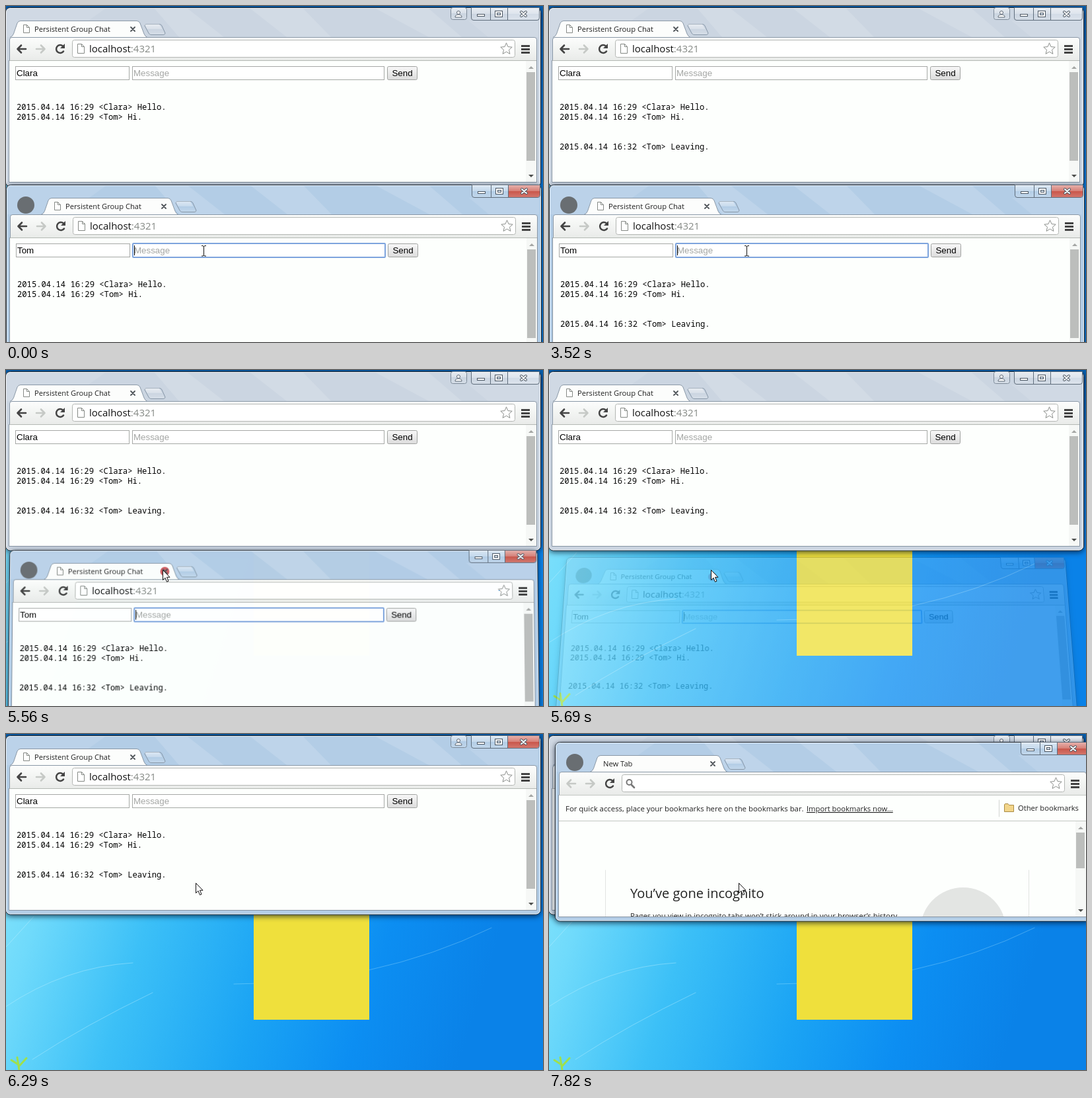
Animation of 813x508 px, one loop 8 s. Source, as an HTML page:

```html
<!DOCTYPE html>
<html lang="en">
<head>
<meta charset="utf-8">
<title>Persistent Group Chat</title>
<style>
html, body { margin: 0; width: 100%; height: 100%; overflow: hidden; background: #0a78dc; }
#stage { position: relative; width: 813px; height: 508px; overflow: hidden; }
svg { position: absolute; left: 0; top: 0; overflow: visible; }
.win { position: absolute; width: 813px; height: 275px; --glass: #cbd5e1; --close: #d3dce7; }
.win.active { --glass: #b3cde6; --close: #c9564a; }
#one { left: 0; top: 0; }
#two { left: 1px; top: 268px; transform-origin: 384px 153px; }
#three { left: 10px; top: 10px; transform-origin: 400px 115px; }
.frame { fill: var(--glass); stroke: #1f2a35; filter: drop-shadow(0 2px 4px rgba(0, 10, 30, .7)); }
.close { fill: var(--close); }
.ui { font: 11.2px "Open Sans", "Noto Sans", sans-serif; fill: #222; }
.url { font-size: 15px; fill: #111; }
.form { font: 13.33px "Liberation Sans", Arial, sans-serif; fill: #000; }
.hint { fill: #a4a6a4; }
.chat { font: 12.2px "Noto Sans Mono", "DejaVu Sans Mono", monospace; fill: #000; }
.line { fill: none; stroke-linecap: round; stroke-linejoin: round; }
</style>
</head>
<body>
<div id="stage">
  <svg id="desk" width="813" height="508">
    <defs>
      <linearGradient id="sky" x2="1" y2=".2">
        <stop offset="0" stop-color="#8ee8fb"/>
        <stop offset=".16" stop-color="#6fdafb"/>
        <stop offset=".36" stop-color="#3cc0f7"/>
        <stop offset=".6" stop-color="#1ba4f4"/>
        <stop offset=".8" stop-color="#0c8ef2"/>
        <stop offset="1" stop-color="#0a82e8"/>
      </linearGradient>
      <linearGradient id="top" x2="0" y2="1">
        <stop offset="0" stop-color="#075fae"/>
        <stop offset=".5" stop-color="#0a70c8" stop-opacity="0"/>
      </linearGradient>
      <linearGradient id="bar" x2="0" y2="1">
        <stop offset="0" stop-color="#fcfdfc"/>
        <stop offset="1" stop-color="#e9ebe9"/>
      </linearGradient>
      <linearGradient id="gloss" x2="0" y2="1">
        <stop offset="0" stop-color="#fff" stop-opacity=".55"/>
        <stop offset=".48" stop-color="#fff" stop-opacity=".25"/>
        <stop offset=".5" stop-color="#fff" stop-opacity="0"/>
        <stop offset="1" stop-color="#fff" stop-opacity=".2"/>
      </linearGradient>
      <linearGradient id="button" x2="0" y2="1">
        <stop offset="0" stop-color="#f8f8f8"/>
        <stop offset="1" stop-color="#dcdcdc"/>
      </linearGradient>
      <clipPath id="page"><path d="M5 83H803V266H5Z"/></clipPath>
    </defs>
    <path fill="url(#sky)" d="M0 0H813V508H0Z"/>
    <path fill="url(#top)" d="M0 0H813V508H0Z"/>
    <g class="line" stroke="#c8f3ff">
      <path opacity=".3" d="M345 378Q560 378 735 293"/>
      <path opacity=".4" d="M0 412Q90 352 192 346M0 322L42 276"/>
      <path opacity=".4" d="M40 492Q120 440 222 391"/>
    </g>
    <path class="line" stroke="#9fe04c" stroke-width="3" d="M20 508L17 489M19 500L8 493M20 502L31 490"/>
    <path fill="#efe03c" d="M375 257H550V432H375Z"/>
  </svg>
  <div class="win" id="one"></div>
  <div class="win active" id="two"></div>
  <div class="win active" id="three"></div>
  <svg id="pointer" width="1" height="1">
    <path id="arrow" fill="#fff" stroke="#111" d="M.5.5V15.5L4 12.2L6.5 18.3L9 17.2L6.5 11.3H11Z"/>
    <path id="beam" fill="none" stroke="#111" d="M-3-7.5H-1L.5-6.5L2-7.5H4M.5-7V7.5M-3 8H-1L.5 7L2 8H4"/>
    <g id="busy" fill="none">
      <circle cx="14.5" cy="-1" r="6.300" fill="#f2fbfd" stroke="#3c86ab" stroke-width="3.400"/>
      <path stroke="#8fe2ee" stroke-width="2" d="M8.200-1A6.300 6.300 0 0 0 14.500 5.300"/>
    </g>
  </svg>
</div>
<script>
const $ = id => document.getElementById(id);
const text = (x, y, cls, s, extra = '') => `<text x="${x}" y="${y}" class="${cls}" ${extra}>${s}</text>`;
const box = (x, y, w, h, fill, stroke = 'none', extra = '') =>
  `<rect x="${x}" y="${y}" width="${w}" height="${h}" fill="${fill}" stroke="${stroke}" ${extra}/>`;
const line = (d, color, width = 1, extra = '') =>
  `<path class="line" d="${d}" stroke="${color}" stroke-width="${width}" ${extra}/>`;
const show = (id, on) => $(id).style.display = on ? '' : 'none';

const sheet = (x, y, w, h) =>
  `<path fill="#fff" stroke="#858985" d="M${x} ${y}h${w - 4}l4 4v${h - 4}h${-w}zM${x + w - 4} ${y}v4h4"/>`;

function star(cx, cy) {
  const pts = Array.from({ length: 10 }, (_, i) => {
    const r = i % 2 ? 4.2 : 9.2, a = i * Math.PI / 5 - Math.PI / 2;
    return (cx + r * Math.cos(a)).toFixed(1) + ',' + (cy + r * Math.sin(a)).toFixed(1);
  });
  return `<polygon points="${pts.join(' ')}" fill="#fff" stroke="#8b8e8b" stroke-linejoin="round"/>`;
}

const buttons = user =>
  (user ? box(673.5, 2.5, 24, 18, 'url(#gloss)', '#7d8a98', 'rx="3"') +
    '<circle cx="685" cy="10" r="2.5" fill="#fff" stroke="#5b6673"/>' +
    '<path fill="#fff" stroke="#5b6673" d="M680 17Q680 13 685 13T690 17Z"/>' : '') +
  '<path class="close" d="M759 3H807V18Q807 21 803 21H759Z"/>' +
  '<path fill="url(#gloss)" stroke="#5f6d7c" d="M704.5 2.5H807.5V18Q807.5 21.5 804 21.5H708Q704.5 21.5 704.5 18ZM733.5 3V21M759.5 3V21"/>' +
  box(713.5, 12.5, 11, 3, '#fff', '#4b5662') +
  box(740.5, 7.5, 11, 9, '#fff', '#4b5662') + box(743.5, 10.5, 5, 3, '#cfdbe7', '#4b5662') +
  line('M780 9L787 15M787 9L780 15', '#4b5662', 4) + line('M780 9L787 15M787 9L780 15', '#fff', 2);

const tab = (dx, title, icon, id) => `<g transform="translate(${dx})">
  <path fill="var(--glass)" stroke="#8797a8" d="M213 27.5H232Q235 27.5 236 30L241 41Q241 43.5 238 43.5H220Q217 43.5 216 41L210 30Q210 27.5 213 27.5Z"/>
  <path fill="url(#gloss)" d="M213 27.5H232L241 43H218L210 28Z"/>
  <path fill="#fcfdfc" stroke="#8a98a7" d="M6 47.5Q10 46 11.5 42L17 26Q18.5 22.5 22 22.5H198Q201.5 22.5 203 26L209 42Q210.5 46 214 47.5"/>
  ${icon ? sheet(26.5, 28.5, 9, 12) : ''}
  ${text(icon ? 43 : 26, 39, 'ui', title)}
  <circle id="${id}Hover" cx="191.5" cy="35" r="7" fill="#cf5e63" style="display:none"/>
  ${line('M189 32L195 38M195 32L189 38', '#4f5459', 1.8)}
</g>`;

const toolbar = fresh => {
  const back = fresh ? '#c6c9c6' : '#444';
  return `<path fill="url(#bar)" stroke="#8a98a7" d="M5.5 82V51Q5.5 47.5 9 47.5H800Q803.5 47.5 803.5 51V82"/>` +
    line('M30 65H18M23 59.5L17.5 65L23 70.5', back, 2.6) +
    line('M46 65H58M53 59.5L58.5 65L53 70.5', '#c6c9c6', 2.6) +
    `<g id="${fresh ? 'reload' : ''}">` + line('M87 68.5A6 6 0 1 1 86 60.5', '#444', 2.5) +
    '<path fill="#444" d="M89 57V64H82Z"/></g>' +
    (fresh ? line('M77.5 60.5L86.5 69.5M86.5 60.5L77.5 69.5', '#444', 3, 'id="stop"') : '') +
    box(100.5, 51.5, 670, 26, '#fff', '#b3b6b3', 'rx="3"') +
    (fresh ? '<circle cx="111.5" cy="63" r="4" fill="none" stroke="#777" stroke-width="2"/>' + line('M115 67L119 71', '#777', 2.6) +
      box(125, 57, 1, 16, '#111', 'none', 'id="urlCaret"')
      : sheet(108.5, 57.5, 10, 14) + text(126, 70, 'ui url', 'localhost<tspan fill="#858985">:4321</tspan>')) +
    star(757.5, 65) +
    [59, 64, 69].map(y => box(780, y, 13, 3, '#444')).join('');
};

const scrollbar = (top, size) =>
  box(787, top, 16, 266 - top, '#f6f8f6') + box(788, top + 17, 13, size, '#bcbebc') +
  `<path fill="#a4a6a4" d="M791 ${top + 12}h8l-4-4z"/><path fill="#4d4f4d" d="M791 255h8l-4 4z"/>`;

const chatLines = (id, name, focused) =>
  box(5, 83, 798, 183, '#fdfffd') + line('M5 82.5H803', '#b4b8b4') +
  box(14.5, 91.5, 172, 20, '#fff', '#a6a8a6') + text(16, 106, 'form', name) +
  (focused ? box(191, 91, 382, 21, '#fff', '#7ea4dd', 'stroke-width="2" rx="1"') : box(191.5, 91.5, 381, 20, '#fff', '#a6a8a6')) +
  text(193, 106, 'form hint', 'Message', `id="${id}Field"`) +
  box(193, 94, 1, 15, focused ? '#000' : 'none', 'none', `id="${id}Caret"`) +
  box(577.5, 91.5, 45, 20, 'url(#button)', '#a0a2a0', 'rx="2"') + text(600, 106, 'form', 'Send', 'text-anchor="middle"') +
  text(16, 157, 'chat', '2015.04.14 16:29 &lt;Clara&gt; Hello.') +
  text(16, 172, 'chat', '2015.04.14 16:29 &lt;Tom&gt; Hi.') +
  text(16, 217, 'chat', '2015.04.14 16:32 &lt;Tom&gt; Leaving.', `id="${id}Last"`) +
  scrollbar(83, 134);

const newTab =
  box(5, 83, 798, 183, '#fdfffd') + line('M5 82.5H803M5 121.5H803', '#c3c7c3') +
  text(15, 107, 'ui', 'For quick access, place your bookmarks here on the bookmarks bar.', 'style="font-size:11.4px"') +
  text(380, 107, 'ui', 'Import bookmarks now...', 'text-decoration="underline"') +
  line('M671.5 90V115', '#d2d5d2') +
  '<path fill="#f2d58a" stroke="#a98b45" d="M679.5 107.5V96.5L681 95.5H685L686.5 97.5H693.5V107.5Z"/>' +
  text(700, 106, 'ui', 'Other bookmarks') +
  '<g id="intro" clip-path="url(#page)">' + line('M75.5 196V268M716.5 196V268', '#e2e4e2') +
  '<circle cx="617" cy="287" r="65" fill="#e3e5e3"/>' +
  text(113, 238, 'ui', 'You’ve gone incognito', 'style="font-size:20px"') +
  text(113, 269, 'ui', 'Pages you view in incognito tabs won’t stick around in your browser’s history,', 'style="font-size:11.4px"') +
  scrollbar(122, 54) + '</g>';

function build(id, title, hidden, body) {
  $(id).innerHTML = `<svg width="813" height="275">
    <rect class="frame" x="-.5" y="2.5" width="810" height="270.5" rx="7"/>
    <path fill="#fff" opacity=".14" d="M225 4H275L330 47H262ZM370 4H450L492 47H425ZM560 4H640L690 47H640Z"/>
    <path fill="#fff" opacity=".1" d="M1 4H150L90 47H1ZM700 22H806V47H730Z"/>
    <rect x=".5" y="3.5" width="808" height="268.5" rx="6" fill="none" stroke="#fff" opacity=".65"/>
    ${hidden ? '<circle cx="29" cy="33" r="13" fill="#696e72"/>' : ''}
    ${buttons(!hidden)}${tab(hidden ? 46 : 0, title, id !== 'three', id)}${toolbar(id === 'three')}${body}
    <path fill="none" stroke="#8593a2" d="M4.5 82V266.5H803.5V82"/></svg>`;
}
build('one', 'Persistent Group Chat', false, chatLines('one', 'Clara', false));
build('two', 'Persistent Group Chat', true, chatLines('two', 'Tom', true));
build('three', 'New Tab', true, newTab);

// Each list holds [start, ...values]; the last entry already started applies.
const at = (list, t) => list.filter(e => e[0] <= t).pop().slice(1);
const typed = [[0, 0], [840, 1], [1000, 2], [1170, 3], [1330, 4], [1500, 6], [1660, 7], [1940, 8], [2370, 0]];
const caret = [[0, 1], [260, 0], [840, 1], [2910, 0], [3520, 1], [3980, 0], [4450, 1], [5010, 0], [5410, 1]];
const moves = [[4570, 237, 302], [5690, 245, 302], [5830, 262, 284], [5980, 278, 252], [6140, 285, 231], [6290, 287, 225]];
// opacity, tilt in degrees, scale
const closing = [[0, 1, 0, 1], [5560, .99, 1.5, .99], [5690, .22, 11, .957], [5830, 0, 14, .93]];
const opening = [[0, 0, -9, .93], [7130, .15, -8, .935], [7270, .68, -4.6, .957], [7390, .95, -1, .99], [7530, 1, 0, 1]];

function pose(id, [alpha, tilt, scale]) {
  const s = $(id).style;
  s.display = alpha ? '' : 'none';
  s.opacity = alpha;
  s.transform = tilt ? `perspective(1000px) rotateX(${tilt}deg) scale(${scale})` : 'none';
}

function pointerAt(t) {
  if (t >= 4570) return at(moves, t);
  const k = Math.min(7, Math.max(0, Math.floor((t - 3520) / 132.8))) / 7;
  const e = k * k * (3 - 2 * k);
  return [299 - 65 * e, 370 - 66 * e];
}

function draw(t) {
  const n = at(typed, t)[0], field = $('twoField');
  field.textContent = n ? 'Leaving.'.slice(0, n) : 'Message';
  field.classList.toggle('hint', !n);
  $('twoCaret').setAttribute('x', 193 + (n ? Math.round(field.getComputedTextLength()) : 0));
  show('twoCaret', at(caret, t)[0]);
  show('oneLast', t >= 2370);
  show('twoLast', t >= 2370);
  show('twoHover', t >= 4450);

  pose('two', at(closing, t));
  pose('three', at(opening, t));
  $('one').classList.toggle('active', t >= 5830 && t < 7130);
  show('reload', t >= 7680);
  show('stop', t < 7680);
  show('intro', t >= 7530);
  show('urlCaret', t < 7680);

  const [x, y] = pointerAt(t), beam = y > 360;
  $('pointer').style.transform = `translate(${Math.round(x)}px, ${Math.round(y)}px)`;
  show('beam', beam);
  show('arrow', !beam);
  show('busy', t >= 7130 && t < 7680);
}

function tick() {
  draw(performance.now() % 8000);
  requestAnimationFrame(tick);
}
tick();
</script>
</body>
</html>
```
